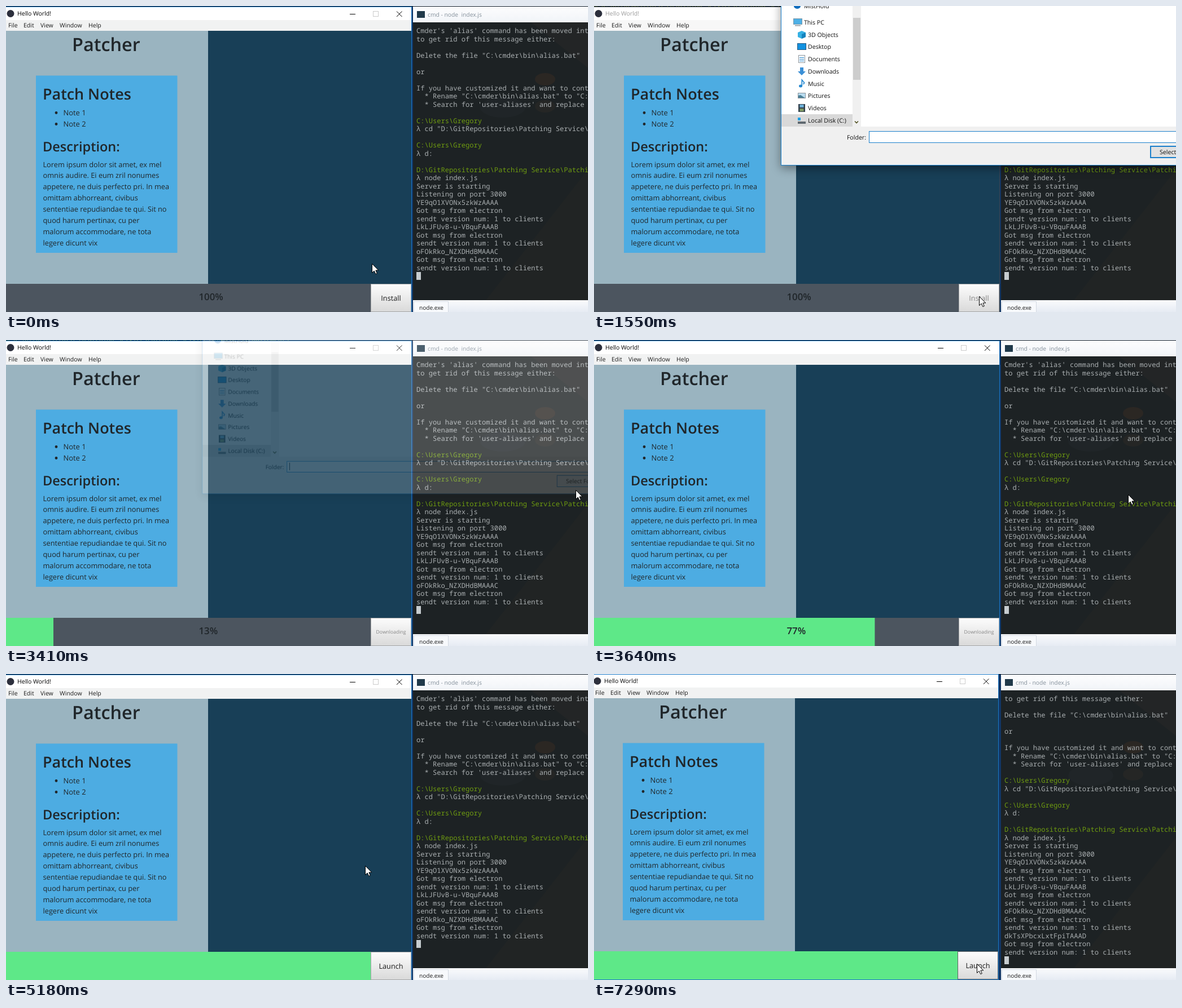
Recreate the animation shown at these times as an HTML page with a canvas. Size 1031 px wide and 543 px high, loop 8000 ms.

```html
<!DOCTYPE html>
<html lang="en">
<head>
<meta charset="utf-8">
<title>Patcher</title>
<style>
html, body { margin: 0; width: 100%; height: 100%; overflow: hidden; background: #0b1a2e; }
canvas { display: block; }
</style>
</head>
<body>
<canvas id="stage" width="1031" height="543"></canvas>
<script>
const LOOP = 8000, STEP = 76.25;
const SANS = '"Open Sans", "Noto Sans", sans-serif';
const MONO = '"Noto Sans Mono", "DejaVu Sans Mono", monospace';
const stage = document.getElementById('stage').getContext('2d');
let g = stage;

// ---------- helpers ----------
function rect(x, y, w, h, fill) {
  g.fillStyle = fill;
  g.fillRect(x, y, w, h);
}
function frame(x, y, w, h, color) {
  g.strokeStyle = color;
  g.lineWidth = 1;
  g.strokeRect(x + .5, y + .5, w - 1, h - 1);
}
function disc(x, y, rx, ry, fill) {
  g.fillStyle = fill;
  g.beginPath();
  g.ellipse(x, y, rx, ry, 0, 0, 7);
  g.fill();
}
function shape(points, fill) {
  g.fillStyle = fill;
  g.beginPath();
  points.forEach(([x, y]) => g.lineTo(x, y));
  g.closePath();
  g.fill();
}
function lines(color, width, ...paths) {
  g.strokeStyle = color;
  g.lineWidth = width;
  g.beginPath();
  for (const [first, ...rest] of paths) {
    g.moveTo(...first);
    rest.forEach(p => g.lineTo(...p));
  }
  g.stroke();
}
function text(str, x, y, size, color, weight = 400, family = SANS, align = 'left') {
  g.font = `${weight} ${size}px ${family}`;
  g.textRendering = 'geometricPrecision';
  g.textAlign = align;
  g.fillStyle = color;
  g.fillText(str, x, y);
}
function vertical(y0, y1, from, to) {
  const grad = g.createLinearGradient(0, y0, 0, y1);
  grad.addColorStop(0, from);
  grad.addColorStop(1, to);
  return grad;
}
// Linear interpolation through keys [time, value...]
function track(t, keys) {
  const i = keys.findIndex(k => k[0] > t);
  if (i < 0) return keys[keys.length - 1].slice(1);
  if (i === 0) return keys[0].slice(1);
  const a = keys[i - 1], b = keys[i], q = (t - a[0]) / (b[0] - a[0]);
  return a.slice(1).map((v, n) => v + (b[n + 1] - v) * q);
}
// Last key whose time has passed
const hold = (t, keys) => keys.filter(k => k[0] <= t).pop();

// ---------- terminal ----------
const client = id => [id, 'Got msg from electron', 'sendt version num: 1 to clients'];
const LOG = [
  "Cmder's 'alias' command has been moved into",
  'to get rid of this message either:', '',
  'Delete the file "C:\\cmder\\bin\\alias.bat"', '',
  'or', '',
  'If you have customized it and want to continue',
  '  * Rename "C:\\cmder\\bin\\alias.bat" to "C:\\cmder',
  "  * Search for 'user-aliases' and replace it", '',
  'C:\\Users\\Gregory',
  'λ cd "D:\\GitRepositories\\Patching Service\\Patching', '',
  'C:\\Users\\Gregory',
  'λ d:', '',
  'D:\\GitRepositories\\Patching Service\\Patching',
  'λ node index.js',
  'Server is starting',
  'Listening on port 3000',
  ...client('YE9qO1XVONx5zkWzAAAA'),
  ...client('LkLJFUvB-u-VBquFAAAB'),
  ...client('oFOkRko_NZXDHdBMAAAC')
];
const LOG_AFTER = [...LOG.slice(1), ...client('dkTsXPbcxLxtFpiTAAAD')];

function drawTerminal(log) {
  rect(721, 1, 310, 28, vertical(1, 29, '#fdfdfe', '#f1f4f8'));
  rect(728, 9, 14, 12, '#20394a');
  text('cmd - node  index.js', 747, 19, 10.3, '#84909b');

  rect(721, 29, 310, 493, '#1d2224');
  shape([[1031, 290], [1031, 522], [850, 522]], 'rgba(60,52,40,.14)');
  shape([[930, 29], [1031, 29], [1031, 110]], 'rgba(70,62,55,.14)');
  disc(955, 130, 18, 11, 'rgba(170,80,35,.1)');
  disc(955, 178, 18, 11, 'rgba(130,90,60,.08)');
  disc(880, 180, 40, 18, 'rgba(70,80,90,.08)');

  const y = i => 48 + 14.5 * i;
  log.forEach((line, i) =>
    text(line, 727, y(i), 12.1, /^[CD]:/.test(line) ? '#6f9c10' : '#a9aeb0', 400, MONO));
  rect(727, y(log.length) - 11, 8, 14, '#c6cccf');

  rect(721, 522, 310, 21, vertical(522, 543, '#fafbfd', '#e6ebf3'));
  rect(722, 524, 62, 19, '#f7f9fc');
  frame(722, 524, 62, 22, '#d3d9e1');
  text('node.exe', 732, 538.5, 10.1, '#1c1c1c');
}

// ---------- patcher window ----------
const STORY = [
  'Lorem ipsum dolor sit amet, ex mel', 'omnis audire. Ei eum zril nonumes',
  'appetere, ne duis perfecto pri. In mea', 'omittam abhorreant, civibus',
  'sententiae repudiandae te qui. Sit no', 'quod harum pertinax, cu per',
  'malorum accommodare, ne tota', 'legere dicunt vix'
];
const MENU = [['File', 4], ['Edit', 31], ['View', 61], ['Window', 95], ['Help', 146]];

function drawPatcher({ active, hover, bar, message, x, label, off }) {
  const dark = '#20262a', edge = active ? '#1a78c8' : '#3c4650';
  rect(-2, 1, 721, 543, edge);
  rect(-2, 2, 720, 23, '#fff');
  disc(8, 13.5, 6.5, 6.5, '#2c2f3c');
  const ink = active ? '#000' : '#9a9a9a';
  text('Hello World!', 20, 17.4, 10.5, ink);
  lines(ink, 1, [[609, 14.5], [619, 14.5]], [[692, 9.5], [701.5, 19]], [[701.5, 9.5], [692, 19]]);
  frame(650, 9, 10, 10, '#ccc');
  rect(-2, 25, 720, 19, active ? '#f1f2f2' : '#f7f7f7');
  MENU.forEach(([name, left]) => text(name, left, 38, 10.5, '#1a1a1a'));

  rect(-2, 44, 360, 449, '#9ab4c0');
  rect(358, 44, 360, 449, '#183f57');
  text('Patcher', 117, 79.5, 32.4, dark, 600);
  rect(53, 123.5, 250.5, 314.5, '#4dace2');
  text('Patch Notes', 65, 165.5, 26.9, dark, 600);
  [1, 2].forEach(n => {
    disc(89, 169.5 + 20 * n, 2.4, 2.4, dark);
    text('Note ' + n, 101.5, 173.8 + 20 * n, 12.9, dark);
  });
  text('Description:', 65, 258, 23.5, dark, 600);
  STORY.forEach((line, i) => text(line, 65.5, 285.5 + 19.95 * i, 12.75, dark));

  rect(-2, 493, 648, 50, '#4c555f');
  if (bar > 0) rect(-2, 493, 2 + 646 * bar, 50, '#5ee888');
  text(message, x, 522, 16.8, dark, 600);
  rect(646, 493, 72, 50, vertical(493, 543, '#fdfdfd', '#d9d9d9'));
  frame(646, 493, 72, 50, hover && !off ? '#606264' : '#a4a6a8');
  const size = label === 'Downloading' ? 8.6 : 12.7;
  text(label, 682, size < 10 ? 521 : 522.7, size, off ? '#858585' : '#1a1a1a', 400, SANS, 'center');
}

// ---------- folder dialog ----------
const BLUE = '#2488d0', GREY = '#8a949c';
const PLACES = [
  ['3D Objects', y => {
    shape([[368, y - 7], [375, y - 4], [375, y + 4], [368, y + 7], [361, y + 4], [361, y - 4]], '#35b1e4');
    shape([[368, y - 1], [375, y - 4], [375, y + 4], [368, y + 7]], '#1583bd');
  }],
  ['Desktop', y => { rect(361, y - 5, 14, 10, '#1392e0'); frame(360, y - 6, 16, 12, '#2a5a80'); }],
  ['Documents', y => {
    rect(362, y - 7, 12, 14, '#fff');
    frame(362, y - 7, 12, 14, GREY);
    [-3, 0, 3].forEach(d => rect(364, y + d, 8, 1, BLUE));
  }],
  ['Downloads', y => shape([[365, y - 7], [371, y - 7], [371, y], [375, y], [368, y + 7], [361, y], [365, y]], '#3a8fd6')],
  ['Music', y => {
    disc(366, y + 4, 3, 2.5, BLUE);
    lines(BLUE, 1.7, [[368.3, y + 4], [368.3, y - 7], [372.5, y - 2], [371, y + 1]]);
  }],
  ['Pictures', y => {
    rect(361, y - 5, 14, 10, '#b9dcf0');
    shape([[361, y + 5], [361, y], [366, y - 1], [375, y + 5]], '#4a7f96');
    frame(361, y - 5, 14, 10, GREY);
  }],
  ['Videos', y => {
    rect(362, y - 7, 12, 14, '#33414d');
    rect(364.5, y - 6, 7, 5, '#6fb2da');
    rect(364.5, y + 1, 7, 5, '#7f9a63');
  }],
  ['Local Disk (C:)', y => { rect(361, y - 5, 5, 5, '#1fa0e4'); rect(361, y + 2, 14, 4, '#5f686f'); }]
];
const TOP = 20;
const sheet = document.createElement('canvas');
sheet.width = 1200;
sheet.height = 340;

function drawDialog(caret, hover) {
  g = sheet.getContext('2d');
  g.setTransform(1, 0, 0, 1, 0, TOP);
  g.clearRect(0, -TOP, 1200, 340);
  g.shadowColor = 'rgba(0,0,0,.4)';
  g.shadowBlur = 16;
  g.shadowOffsetY = 5;
  rect(331, -60, 830, 343, '#1a7fcb');
  g.shadowColor = 'transparent';
  rect(332, -60, 828, 274, '#fff');
  rect(332, 214, 828, 68, '#f0f0f0');
  rect(458, -60, 15, 274, '#f0f0f0');
  rect(459, 21, 13, 110, '#cdcdcd');
  lines('#505020', 1.6, [[462, 204.5], [465, 207.5], [468, 204.5]]);
  rect(332, 192, 126, 22, '#d9d9d9');

  disc(360, 0, 6, 5, '#0f6cbd');
  text('MistHold', 372, 3.5, 10.6, '#111');
  rect(354, 23, 14, 9, '#4db0e6');
  frame(353, 22, 16, 11, '#7d98a8');
  rect(356, 34, 10, 1.5, GREY);
  text('This PC', 372, 32.5, 10.6, '#111');
  PLACES.forEach(([name, icon], i) => {
    const y = 50.5 + 21.75 * i;
    icon(Math.round(y));
    text(name, 379, y + 4, 10.6, '#111');
  });

  text('Folder:', 482, 236.5, 10.6, '#111', 400, SANS, 'right');
  rect(487, 222, 640, 21, '#fff');
  frame(487, 222, 640, 21, '#1a7fcb');
  if (caret) rect(492, 225, 1, 14, '#000');
  rect(985, 248, 96, 22, hover ? '#e5f1fb' : '#e1e1e1');
  frame(985, 248, 96, 22, '#1a7fcb');
  if (!hover) frame(986, 249, 94, 20, '#1a7fcb');
  text('Select Folder', 1002, 263, 10.6, '#111');
  g = stage;
}

// ---------- timeline ----------
const DIALOG = [ // time, opacity, scale
  [0, 0, 1], [1010, .56, .9786], [1090, .86, .994], [1180, 1, 1],
  [3240, .8, .99], [3320, .5, .975], [3410, .2, .961], [3480, 0, 1]
];
const POINTER = [
  [0, 648, 457], [70, 648, 457], [300, 682, 515], [1690, 682, 515],
  [2080, 850, 400], [2460, 1003, 281], [2620, 1008, 267], [2700, 1009, 266],
  [3480, 1009, 266], [4020, 796, 293], [4640, 632, 340], [4860, 630, 339],
  [5080, 630, 339], [5160, 636, 340], [5700, 636, 340], [6250, 678, 504],
  [6400, 678, 504], [6480, 678, 514]
];

function status(t, tick) {
  const idle = { bar: 0, message: '100%', x: 341.5, label: 'Install', off: false };
  if (t < 690) return idle;
  if (t < 3240) return { ...idle, off: true };
  if (tick < 3720) {
    const pct = Math.floor(track(tick, [[3240, 0], [3410, 13], [3720, 100]])[0]);
    return { ...idle, bar: pct / 100, message: pct + '%', label: 'Downloading', off: true };
  }
  if (t < 4790) {
    const n = Math.floor(track(tick, [[3720, 0], [4020, 52], [4640, 57]])[0]);
    return { bar: n / 57, message: `Extracting ${n} / 57 Files`, x: 224.5, label: 'Extracting', off: true };
  }
  if (t >= 5730 && t < 6660) return idle;
  if (t >= 5730 && t < 7290) return { ...idle, off: true, bar: track(t, [[6810, 0], [6980, 1]])[0] };
  return { ...idle, bar: 1, message: '', label: 'Launch' };
}

function drawPointer([x, y]) {
  g.save();
  g.translate(Math.round(x) + .5, Math.round(y) + .5);
  shape([[0, 0], [0, 16], [3.7, 12.5], [6.3, 18], [8.8, 17], [6.4, 11.5], [11.3, 11.5]], '#fff');
  g.strokeStyle = '#000';
  g.lineWidth = 1;
  g.stroke();
  g.restore();
}

function draw(now) {
  const t = now % LOOP;
  const tick = 3410 + Math.floor((t - 3410) / STEP) * STEP;
  const again = t >= 5730;
  const active = t < 1010 || t >= 3320;
  const [, opacity, scale] = hold(t, DIALOG);
  const pointer = track(tick, POINTER);
  const [px, py] = pointer;

  rect(0, 0, 1031, 543, '#123665');
  rect(0, 0, 1031, 1, '#0c1a28');
  if (t >= 690 && t < 3480)
    text('λ D:\\GitRepositories\\Patching Service\\Patching Service\\launcher\\requirements', 0, 1.5, 11, '#7d8a1c', 400, MONO);
  drawTerminal(again ? LOG_AFTER : LOG);

  g.save();
  if (again) g.translate(-2, -1);
  drawPatcher({ active, hover: px > 646 && px < 718 && py > 493, ...status(t, tick) });
  g.restore();

  if (opacity) {
    const caret = t < 1550 || (t >= 2080 && t < 2610) || t >= 3100;
    drawDialog(caret, px > 985 && py < 270);
    g.save();
    g.globalAlpha = opacity;
    g.translate(747, 36);
    g.scale(scale, scale);
    g.drawImage(sheet, -747, -36 - TOP);
    g.restore();
  }
  drawPointer(pointer);
}

const start = performance.now();
(function loop() {
  draw(performance.now() - start);
  requestAnimationFrame(loop);
})();
</script>
</body>
</html>
```
